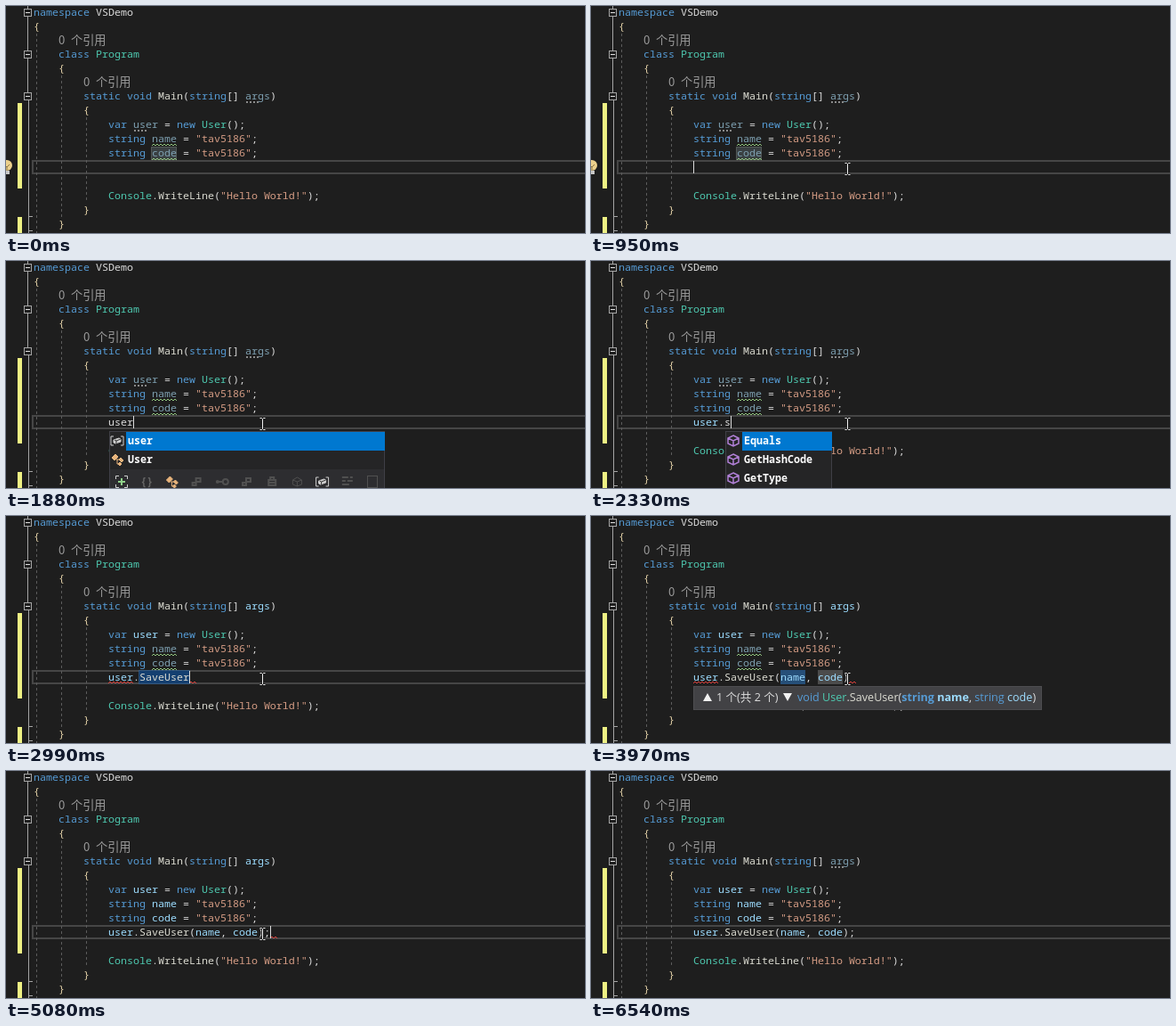
These frames come from a looping animation (651 px wide and 255 px high, 7.15 s). An HTML page:

```html
<!DOCTYPE html>
<html lang="zh">
<head>
<meta charset="utf-8">
<title>Argument completion</title>
<style>
html, body { margin: 0; width: 100%; height: 100%; overflow: hidden; background: #1e1e1e; }
svg { display: block; width: 651px; height: 255px; }
text { white-space: pre; }
.code { font: 500 11.667px "Noto Sans Mono", monospace; fill: #dcdcdc; }
.bold { font-weight: 700; fill: #fff; }
.cjk { font: 13.2px "Noto Sans CJK SC", "Noto Sans CJK", sans-serif; fill: #9c9c9c; }
.tip { font: 12.6px "Open Sans", "Noto Sans CJK SC", sans-serif; fill: #dcdcdc; }
.k { fill: #569cd6; }
.t { fill: #4ec9b0; }
.v { fill: #9cdcfe; }
.m { fill: #dcdcd2; }
.s { fill: #d69d85; }
.f { fill: #7d9fb0; }
.p { fill: #e4d2a8; }
.b { font-weight: 700; }
</style>
</head>
<body>
<svg viewBox="0 0 651 255" id="stage"></svg>
<script>
const LOOP = 7150, CH = 7;
const stage = document.getElementById('stage');
const timed = [];

function add(name, attrs = {}, parent = stage) {
  const el = document.createElementNS('http://www.w3.org/2000/svg', name);
  for (const key in attrs) el.setAttribute(key, attrs[key]);
  parent.appendChild(el);
  return el;
}

// Group that is visible during the given [from, to) spans.
function during(...spans) {
  const el = add('g');
  timed.push({ el, spans });
  return el;
}

const rect = (x, y, width, height, fill, parent) => add('rect', { x, y, width, height, fill }, parent);
const path = (d, stroke, parent, extra = {}) => add('path', { d, stroke, fill: 'none', ...extra }, parent);

// Parts look like "k:var" or ":plain".
function text(x, y, cls, parts, parent) {
  const el = add('text', { x, y, class: cls }, parent);
  for (const part of parts) {
    const cut = part.indexOf(':');
    add('tspan', { class: part.slice(0, cut) }, el).textContent = part.slice(cut + 1);
  }
  return el;
}
const code = (x, y, parts, parent) => text(x, y, 'code', parts, parent);

function squiggle(x, y, width, color, parent) {
  let d = `M${x} ${y + 1}`;
  for (let i = 2; i <= width; i += 2) d += `L${x + i} ${y + (i % 4 ? -1 : 1)}`;
  path(d, color, parent);
}

function dots(x, y, parent) {
  for (let i = 0; i < 4; i++) rect(x + 1 + i * 4, y, 2, 2, '#8a8a8a', parent);
}

// Gutter and outlining
rect(13, 109, 5, 96, '#eff284');
rect(13, 237, 5, 18, '#eff284');
path('M24.5 0V97M25.5 105V255M25.5 236.5H30M25.5 252.5H30', '#a5a5a5');
for (const y of [7, 54, 101]) {
  add('rect', { x: 20.5, y: y - 3.5, width: 8, height: 8, fill: '#1e1e1e', stroke: '#a5a5a5' });
  path(`M22 ${y + .5}H27`, '#e0e0e0');
}

add('rect', { x: 30, y: 174, width: 630, height: 14, fill: 'none', stroke: '#464646', 'stroke-width': 2 },
  during([0, 3380], [4750, LOOP]));
path('M34.5 31V255M62.5 78V237M90.5 125V221', '#5c5c5c', stage, { 'stroke-dasharray': '3 3' });

const bulb = during([0, 1540]);
add('circle', { cx: 1, cy: 179, r: 6, fill: '#ecd08c' }, bulb);
path('M-2 178L1 181L4 178M1 181V185', '#8a7445', bulb);
rect(-2, 185, 6, 4, '#c8c8c8', bulb);

const driver = during([4400, 5080]);
path('M0 184L4 180', '#b8b8b8', driver, { 'stroke-width': 4 });
path('M0 184L4 180', '#303030', driver);
path('M4 180L8 176L8 174', '#d0d0d0', driver, { 'stroke-width': 1.5 });

// Static code
code(31, 11, ['k:namespace', ': VSDemo']);
code(31, 27, ['p:{']);
for (const [x, y] of [[59, 43], [87, 90]]) {
  text(x, y, 'cjk', [':0']);
  text(x + 14, y, 'cjk', [':个引用']);
}
code(59, 58, ['k:class', 't: Program']);
code(59, 74, ['p:{']);
code(87, 105, ['k:static void', 'm: Main', ':(', 'k:string', ':[]']);
code(87 + 30 * CH, 105, [':)']);
code(87, 121, ['p:{']);
code(115, 137, ['k:var']);
code(115 + 8 * CH, 137, [': = ', 'k:new', 't: User', ':();']);
for (const y of [153, 169]) {
  code(115, y, ['k:string']);
  code(115 + 11 * CH, y, [': = ', 's:"tav5186"', ':;']);
}
code(115, 217, ['t:Console', ':.', 'm:WriteLine', ':(', 's:"Hello World!"', ':);']);
code(87, 233, ['p:}']);
code(59, 249, ['p:}']);

// Names that fade while unused
function name(x, y, word, fadeSpans, liveSpans) {
  code(x, y, ['f:' + word], during(...fadeSpans));
  code(x, y, ['v:' + word], during(...liveSpans));
}
add('rect', { x: 163.5, y: 158.5, width: 28, height: 14, fill: '#3a4042', stroke: '#7a857e', 'stroke-dasharray': '1 1' },
  during([0, 1540]));
const argsFaded = [[0, 2400], [5480, LOOP]];
name(269, 105, 'args', argsFaded, [[2400, 5480]]);
dots(269, 107, during(...argsFaded));
name(143, 137, 'user', [[0, 2400]], [[2400, LOOP]]);
dots(143, 139, during([0, 2400]));
name(164, 153, 'name', [[0, 4030]], [[4030, LOOP]]);
name(164, 169, 'code', [[0, 4030]], [[4030, LOOP]]);
const warn = during([0, 4030]);
squiggle(164, 156, 28, '#8fc27c', warn);
squiggle(164, 172, 28, '#8fc27c', warn);

// Highlights on the typed line
const BLUE = '#264f78', GREY = '#4b4b4b';
add('rect', { x: 149.5, y: 173.5, width: 57, height: 15, fill: '#143f70', stroke: '#3f6f9f', 'stroke-dasharray': '1 1' },
  during([2930, 3380]));
function field(x, color, from, to) { rect(x, 173, 28, 16, color, during([from, to])); }
field(213, BLUE, 3440, 4300);
field(255, GREY, 3440, 4300);
field(213, GREY, 4300, 4750);
field(255, BLUE, 4300, 4750);

// Typed line
const CALL = ['v:user', ':.', 'm:SaveUser', ':(', 'v:name', ':, ', 'v:code', ':)'];
const typing = [
  [1400, [':u']], [1610, [':us']], [1810, [':use']], [1880, [':user']],
  [2130, ['v:user', ':.']], [2330, ['v:user', ':.s']],
  [2870, ['v:user', ':.', 'm:SaveUser']],
  [3380, CALL], [4950, [...CALL, ':;']]
];
typing.forEach(([from, parts], i) => {
  const to = i + 1 < typing.length ? typing[i + 1][0] : LOOP;
  code(115, 185, parts, during([from, to]));
});

const RED = '#e0413c';
squiggle(115, 187, 28, RED, during([2930, 4030]));
squiggle(206, 187, 8, RED, during([2930, 3380]));
squiggle(290, 187, 8, RED, during([3440, 5020]));
squiggle(297, 187, 8, RED, during([5020, 5420]));

function caret(x, ...spans) { rect(x, 174, 1, 14, '#dcdcdc', during(...spans)); }
caret(115, [810, 1400]);
caret(122, [1400, 1610]);
caret(129, [1610, 1810]);
caret(136, [1810, 1880]);
caret(143, [1880, 2130]);
caret(150, [2130, 2330]);
caret(157, [2330, 2870]);
caret(206, [2870, 3380]);
caret(290, [4750, 4950]);
caret(297, [4950, 5480], [6040, 6540]);

// Completion list
const DIM = '#505050', ORANGE = '#e8b47c';
const icons = {
  plus(g) {
    path('M-3 -6.5H-6.5V-3M3 -6.5H6.5V-3M-3 6.5H-6.5V3M3 6.5H6.5V3', '#d0d0d0', g);
    path('M-4 0H4M0 -4V4', '#8fd08a', g, { 'stroke-width': 2 });
  },
  braces(g) { code(-7, 4, [':{}'], g).style.cssText = 'fill:#666;font-weight:700'; },
  type(g) {
    path('M-6 -2L-2 -6L1 -3L-3 1ZM2 0L4 -2L7 1L5 3ZM1 5L3 3L5 5L3 7Z', ORANGE, g, { fill: ORANGE });
    path('M-1 0H3M0 0V5H2', ORANGE, g);
  },
  struct(g) { path('M-1 -4H4V0H-1ZM-5 1H-1V4H-5Z', DIM, g, { 'stroke-width': 2 }); },
  iface(g) {
    path('M-4 0H2', DIM, g, { 'stroke-width': 2 });
    add('circle', { cx: -5, r: 2, fill: DIM }, g);
    add('circle', { cx: 4, r: 3, fill: 'none', stroke: DIM, 'stroke-width': 2 }, g);
  },
  bag(g) { path('M-4 -2H4V4H-4ZM-2 -2V-5H2V-2M-4 1H4', DIM, g, { 'stroke-width': 2 }); },
  cube(g) { path('M0 -5L5 -2V3L0 5L-5 3V-2ZM-5 -2L0 0L5 -2M0 0V5', DIM, g); },
  local(g) {
    path('M-4 -5H-7V5H-4M4 -5H7V5H4', '#d0d0d0', g);
    path('M-4 -1L2 -3L4 -2V1L-2 3L-4 2Z', '#d0d0d0', g, { fill: '#d0d0d0' });
    path('M-3 -1L-1 0L4 -2M-1 0V3', '#333', g);
  },
  word(g) { path('M-6 -5H1M3 -5H6M-6 -1H-2M0 -1H6M-6 3H2', DIM, g, { 'stroke-width': 2 }); },
  snippet(g) { add('rect', { x: -5.5, y: -6.5, width: 11, height: 13, fill: 'none', stroke: DIM }, g); },
  method(g) { path('M0 -6L6 -3V3L0 6L-6 3V-3ZM-6 -3L0 0L6 -3M0 0V6', '#b180d7', g, { 'stroke-width': 1.5 }); }
};
const icon = (kind, x, y, parent) => icons[kind](add('g', { transform: `translate(${x} ${y})` }, parent));

function popup(x, width, items, filters, from, to) {
  const g = during([from, to]);
  const rows = items.length * 21, barY = 192 + rows;
  rect(x - 1, 191, width, rows + 30, '#3f3f46', g);
  rect(x, 192, width - 2, rows, '#252526', g);
  rect(x + 18, 192, width - 19, 21, '#0078d0', g);
  items.forEach(([kind, label], i) => {
    icon(kind, x + 8, 202 + i * 21, g);
    text(x + 20, 206 + i * 21, 'code bold', [':' + label], g);
  });
  rect(x, barY, width - 2, 28, '#2d2d30', g);
  filters.forEach((kind, i) => icon(kind, x + 13 + i * 28.2, barY + 14, g));
  return g;
}

const ALL = ['plus', 'braces', 'type', 'struct', 'iface', 'struct', 'bag', 'cube', 'local', 'word', 'snippet'];
function longList(labels, from, to) {
  const items = labels.map((label, i) => [i ? 'word' : 'local', label]);
  const g = popup(117, 310, items, ALL, from, to);
  rect(418, 192, 8, 63, '#3e3e42', g);
  rect(420, 196, 4, 30, '#686868', g);
}
longList(['user', 'uint', 'ulong'], 1470, 1610);
longList(['user', 'ushort', 'using'], 1610, 1810);
popup(117, 310, [['local', 'user'], ['type', 'User']], ALL, 1810, 2130);
popup(152, 120, ['Equals', 'GetHashCode', 'GetType'].map(label => ['method', label]), ['plus', 'method'], 2200, 2400);
popup(152, 120, [['method', 'SaveUser']], ['plus', 'method'], 2400, 2870);

// Parameter help
function help(active, from, to) {
  const g = during([from, to]);
  add('rect', { x: 115.5, y: 191.5, width: 391, height: 26, fill: '#424245', stroke: '#4d4d50' }, g);
  path('M126 208L131 199L136 208ZM216 199L221 208L226 199Z', 'none', g).setAttribute('fill', '#f1f1f1');
  text(141, 208, 'tip', [':1 个(共 2 个)'], g);
  const param = (word, i) => {
    const bold = i === active ? ' b' : '';
    return [`k${bold}:string`, `v${bold}: ${word}`];
  };
  text(232, 208, 'tip', ['k:void', 't: User', ':.', 'm:SaveUser', ':(',
    ...param('name', 0), ':, ', ...param('code', 1), ':)'], g);
}
help(0, 3440, 4370);
help(1, 4370, 4750);

// Mouse pointer
const mouse = during([70, 5750]);
const beam = 'M-3 -6.5H-1L0 -5.5L1 -6.5H3M0 -5.5V5.5M-3 6.5H-1L0 5.5L1 6.5H3';
path(beam, '#1e1e1e', mouse, { 'stroke-width': 2.5 });
path(beam, '#f0f0f0', mouse);

function mousePos(t) {
  if (t >= 5680) return [341.5, 213];
  const step = Math.min(9, Math.max(0, Math.floor((t - 70) / 74.4))) / 9;
  const left = (1 - step) ** 2;
  return [288.5 + 122 * left, 183 + 41 * left];
}

function render(t) {
  for (const { el, spans } of timed) {
    const on = spans.some(([from, to]) => t >= from && t < to);
    el.setAttribute('visibility', on ? 'visible' : 'hidden');
  }
  mouse.setAttribute('transform', `translate(${mousePos(t)})`);
}

const start = performance.now();
function tick() {
  render((performance.now() - start) % LOOP);
  requestAnimationFrame(tick);
}
tick();
</script>
</body>
</html>
```
